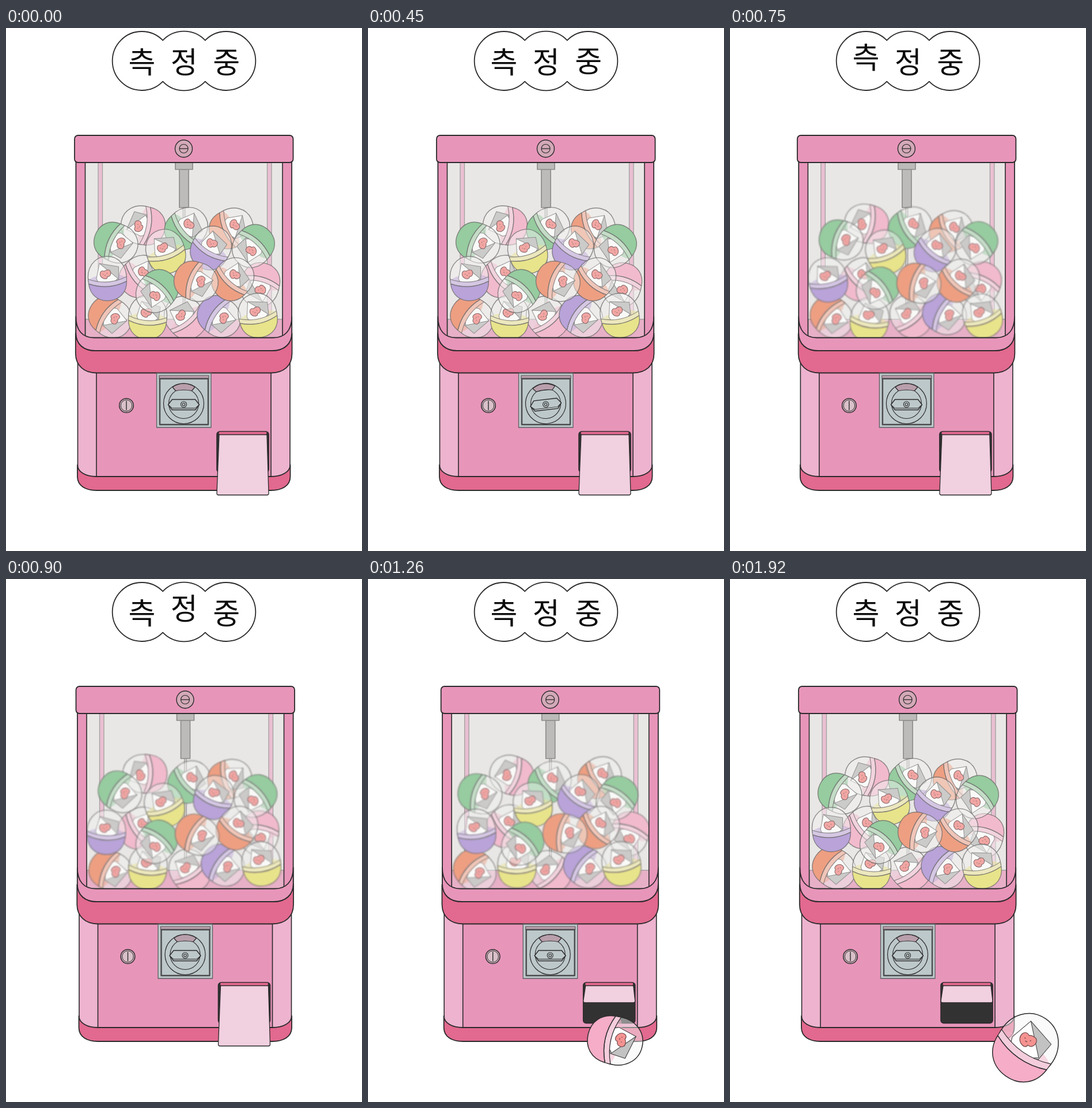
These frames come from a looping animation (618 px wide and 906 px high, 1.95 s). An HTML page with a canvas:

```html
<!DOCTYPE html>
<html lang="ko">
<head>
<meta charset="utf-8">
<style>
html, body { margin: 0; width: 618px; height: 906px; overflow: hidden; background: #fff; }
canvas { display: block; width: 618px; height: 906px; }
</style>
</head>
<body>
<canvas id="stage"></canvas>
<script>
const LOOP = 1950, STEP = 30;
const INK = '#2b2a2b', PINK = '#e895ba', PALE = '#edb3cf', ROSE = '#e2698f';
const STEEL = '#bdc8ca', MAUVE = '#d3a9b8';
const COLORS = { p: '#f4adc6', g: '#7fc48c', o: '#ef8a66', v: '#ab8fd6', y: '#e8e272' };

// colour, x, y, turn in degrees; back to front
const BALLS = [
  ['p', 441, 445, 195], ['p', 311, 502, -40], ['p', 234, 430, 50],
  ['p', 238, 342, 280], ['g', 313, 347, 51], ['o', 391, 347, 65],
  ['v', 370, 500, 125], ['o', 181, 501, 126], ['y', 246, 501, 3],
  ['g', 191, 372, 115], ['y', 277, 387, -18], ['v', 356, 381, 30],
  ['g', 429, 378, 222], ['v', 176, 434, -4], ['o', 394, 435, 42],
  ['g', 262, 456, 222], ['o', 330, 439, 110], ['y', 437, 498, -12]
];

// time, x, y, turn, scale
const ROLL = [
  [1170, 418, 738, 20, .75], [1260, 429, 799.5, 103, 1.25],
  [1500, 471.5, 810, 273, 1.36], [1620, 487, 806, 318, 1.42],
  [1920, 513.5, 811.5, 395, 1.57]
];

const canvas = document.getElementById('stage');
const ctx = canvas.getContext('2d');
const dpr = window.devicePixelRatio || 1;
canvas.width = 618 * dpr;
canvas.height = 906 * dpr;

const clamp = v => Math.max(0, Math.min(1, v));
const ramp = (t, a, b) => clamp((t - a) / (b - a));
const smooth = p => p * p * (3 - 2 * p);
const cubic = p => p < .5 ? 4 * p ** 3 : 1 - 4 * (1 - p) ** 3;
const rad = deg => deg * Math.PI / 180;

function paint(path, fill, stroke = INK, width = 1.6) {
  if (fill) { ctx.fillStyle = fill; ctx.fill(path); }
  if (stroke) { ctx.strokeStyle = stroke; ctx.lineWidth = width; ctx.stroke(path); }
}
const shape = (d, ...style) => paint(new Path2D(d), ...style);
function box(x, y, x2, y2, r, ...style) {
  const p = new Path2D();
  p.roundRect(x, y, x2 - x, y2 - y, r);
  paint(p, ...style);
}
function disc(x, y, r, ...style) {
  const p = new Path2D();
  p.arc(x, y, r, 0, 7);
  paint(p, ...style);
}
function at(x, y, deg, scale, draw) {
  ctx.save();
  ctx.translate(x, y);
  ctx.rotate(rad(deg));
  ctx.scale(scale, scale);
  draw();
  ctx.restore();
}

function card(line, w) {
  shape('M-12-27L21-19L19 3L0 12Z', '#bdbcbc', line, w);
  shape('M-19-1L-12-27L18 1L4 13L-14 11Z', '#fff', line, w);
  at(-2.6, -7.5, -8, 1.12, () => {
    shape('M-1-5C-8-10-12 2-4 6C0 8 2 6 2 4C9 6 11-6 4-6C1-6.5 0-6-1-5Z', '#f58886', '#5b3436', w);
    ctx.fillStyle = '#5b3436';
    for (const x of [-4, 2]) ctx.fillRect(x, -1.5, 1, 1);
    shape('M-2 1Q-1 2.5 0 1', null, '#5b3436', .7);
  });
}

function capsule(color, line, w) {
  const dome = 'M-33 4C-36-20-21-38.5 0-38.5C21-38.5 36-20 33 4Q0 18-33 4Z';
  const band = 'M-33.3-1Q0 13 33.3-1L33 7Q0 21-33 7Z';
  const rim = new Path2D();
  rim.ellipse(0, 2, 32, 9, 0, 0, 7);
  shape(dome, 'rgba(244,242,242,.42)', null);
  ctx.save();
  ctx.globalAlpha = .5;
  paint(rim, color, null);
  ctx.restore();
  card(line, w * .7);
  shape(dome, 'rgba(246,244,244,.1)', line, w);
  shape(band, color, null);
  shape(band, 'rgba(244,238,242,.5)', line, w * .8);
  shape('M-33 7Q0 21 33 7C32 27 18 38.5 0 38.5C-18 38.5-32 27-33 7Z', color, line, w);
}

function title(t) {
  shape('M272.2 21.4A51 51 0 1 0 272.2 92.6A51 51 0 0 0 345.8 92.6A51 51 0 1 0 345.8 21.4A51 51 0 0 0 272.2 21.4Z', '#fff', INK, 1.8);
  ctx.fillStyle = '#0c0c0c';
  ctx.font = '51px "Noto Sans CJK KR", "Noto Sans CJK", sans-serif';
  ctx.textAlign = 'center';
  [...'측정중'].forEach((ch, i) => {
    const p = ramp(t % 650, i * 152, (i + 1) * 152);
    ctx.fillText(ch, 236 + i * 73.3, 77.5 - 32 * p * (1 - p));
  });
}

function shake(t) {
  const size = 8.2 * ramp(t, 500, 1270) * (1 - ramp(t, 1275, 1430));
  return size * Math.cos((t - 1270) / 200 * 2 * Math.PI);
}

function balls(t) {
  const e = smooth(ramp(t, 440, 760)) * (1 - smooth(ramp(t, 1250, 1480)));
  ctx.save();
  ctx.beginPath();
  ctx.rect(137, 233, 344, 310);
  ctx.clip();
  if (e > .15) ctx.filter = `blur(${.9 * e}px)`;
  BALLS.forEach(([c, x, y, turn], i) => {
    const dx = e * 5 * Math.sin(t * .041 + i * 2.4);
    const dy = e * 5 * Math.sin(t * .033 + i * 4.1);
    const dr = e * 9 * Math.sin(t * .027 + i * 1.7);
    at(x + dx, y + dy, turn + dr, 1, () => capsule(COLORS[c], 'rgba(70,68,70,.75)', 1.4));
  });
  ctx.restore();
}

function cabin(t) {
  const grey = '#8d8a8b';
  box(121.5, 230, 496, 545, 0, '#e9e7e5');
  box(138, 504.5, 480, 545, 0, '#e6a0bf', grey, 1.3);
  box(160, 233, 167.5, 504.5, 0, '#e9b3cc', grey, 1.3);
  box(453.5, 233, 461, 504.5, 0, '#e9b3cc', grey, 1.3);
  box(307, 311, 311, 536, 0, '#c4c2c1', grey, 1.2);
  box(301, 245, 317, 311, 0, '#b0aeae', '#757373', 1.7);
  box(294, 233, 324, 245, 0, '#b0aeae', '#757373', 1.7);
  balls(t);
  ctx.fillStyle = 'rgba(233,231,229,.22)';
  ctx.fillRect(138, 233, 342, 304);
  box(121.5, 230, 137.5, 545, 0, PINK);
  box(480, 230, 496, 545, 0, PINK);

  box(119, 186, 498.5, 233, 6, PINK, INK, 1.8);
  disc(308.5, 209, 15, MAUVE, INK, 1.4);
  disc(308.5, 209, 7.5, null, INK, 1.2);
  shape('M301 209H316', null, INK, 1.3);
}

function dial(t) {
  box(261.5, 598, 356, 692, 0, STEEL, '#5c6061', 1.3);
  box(266, 602, 352, 607.5, 0, '#b99fab', '#5a5558', 1.1);
  box(267, 607.5, 351, 687, 0, STEEL, '#4b4b4d', 2.4);
  at(308.5, 650.5, 360 * cubic(ramp(t, 0, 540)), 1, () => {
    disc(0, 0, 35, STEEL, INK, 1.2);
    disc(0, 0, 26, null, INK, 1.1);
    shape('M-19.5-28.5Q0-40.5 19.5-28.5L14-22Q0-25-14-22Z', '#b99fab', INK, 1.2);
    shape('M-27 2L-20-7H20L27 2L20 11H-20Z', STEEL, INK, 1.4);
    shape('M-27 2L-20 8H20L27 2', null, INK, 1);
    disc(0, 1.5, 5, STEEL, INK, 1.1);
    disc(0, 1.5, 2.3, null, INK, 1.1);
  });
}

function body(t) {
  const sill = 'V528C496.2 548 482 559 462 559H155C135 559 121.3 548 121.3 528';
  box(124.5, 575, 493, 780, 0, PALE);
  box(157, 575, 460, 780, 0, PINK);
  shape('M124 757C124.5 769 138 777 157 777H460C479 777 493 769 493.5 757V777C493.5 793 479 801 460 801H157C138 801 124 793 124 777Z', ROSE, INK, 1.8);
  shape(`M496.2 528${sill}L120.8 530V564C121 585 136 597.5 157 597.5H460C482 597.5 496.5 585 496.5 564V530Z`, ROSE, INK, 1.8);
  shape(`M121.3 500C121.3 524 133 536.5 153 536.5H464C484 536.5 496.2 524 496.2 500${sill}Z`, PINK, INK, 1.8);
  dial(t);
  disc(209, 654, 12.3, '#d9b5c2', INK, 1.5);
  disc(209, 654, 9.8, '#d9c0c9', INK, 1);
  shape('M209 646V662', null, INK, 1.4);
  box(366, 699, 456, 769.5, 5, '#333233', INK, 1.6);
  box(369, 699, 453, 704.5, 2, ROSE, INK, 1.2);
}

function flap(t) {
  const end = 809 - 75 * smooth(ramp(t, 960, 1200));
  shape(`M370 704.5H453L456 ${end - 3}Q456 ${end} 453 ${end}H369Q366 ${end} 366 ${end - 3}Z`, '#f1d0e0', INK, 1.3);
}

function prize(t) {
  if (t < ROLL[0][0]) return;
  const i = Math.max(1, ROLL.findIndex(k => k[0] >= t));
  const a = ROLL[i - 1], b = ROLL[i], p = ramp(t, a[0], b[0]);
  const [x, y, turn, scale] = a.slice(1).map((v, j) => v + (b[j + 1] - v) * p);
  at(x, y, turn, scale, () => capsule('#f6adc7', INK, 1.5 / scale));
}

function render(t) {
  ctx.setTransform(dpr, 0, 0, dpr, 0, 0);
  ctx.fillStyle = '#fff';
  ctx.fillRect(0, 0, 618, 906);
  ctx.lineJoin = 'round';
  title(t);
  const dx = shake(t);
  at(dx, 0, 0, 1, () => { cabin(t); body(t); });
  prize(t);
  at(dx, 0, 0, 1, () => flap(t));
}

const start = performance.now();
function tick() {
  const t = (performance.now() - start) % LOOP;
  render(Math.floor(t / STEP) * STEP);
  requestAnimationFrame(tick);
}
tick();
</script>
</body>
</html>
```
